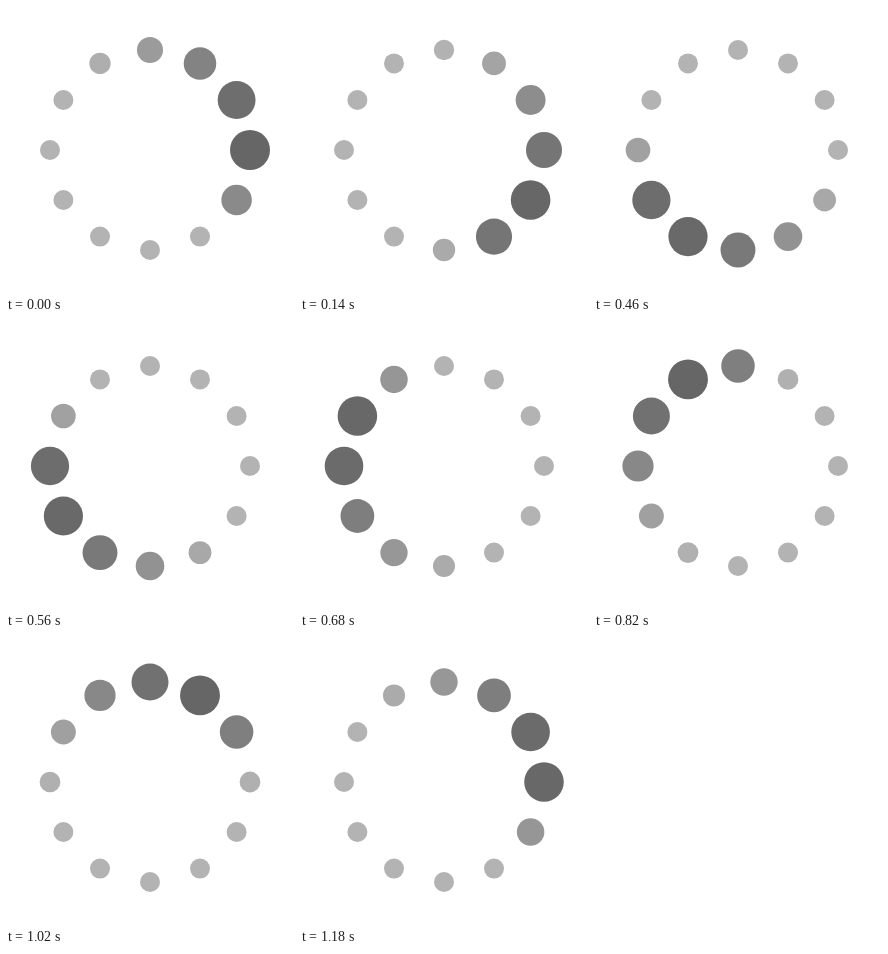
An HTML page for the animation above (1200 ms loop, 288x288 px).

```html
<!DOCTYPE html>
<html lang="en">
<head>
<meta charset="utf-8">
<title>Loading spinner</title>
<style>
html, body { margin: 0; width: 100%; height: 100%; overflow: hidden; background: #fff; }
svg { display: block; width: 100%; height: 100%; }
</style>
</head>
<body>
<svg viewBox="0 0 288 288"></svg>
<script>
const PERIOD = 1200, COUNT = 12, RISE = 205, FALL = 480;
const svg = document.querySelector('svg');

const dots = Array.from({ length: COUNT }, (_, i) => {
  const angle = i / COUNT * 2 * Math.PI;
  const dot = document.createElementNS('http://www.w3.org/2000/svg', 'circle');
  dot.setAttribute('cx', 144 + 100 * Math.cos(angle));
  dot.setAttribute('cy', 144 + 100 * Math.sin(angle));
  return svg.appendChild(dot);
});

const ease = p => (1 - Math.cos(Math.PI * p)) / 2;

// Swell of a dot, 0 to 1, by the time since its peak
function swell(age) {
  if (age < FALL) return 1 - ease(age / FALL);
  return ease(Math.max(0, 1 - (PERIOD - age) / RISE));
}

function draw(now) {
  dots.forEach((dot, i) => {
    const age = (now + PERIOD - i * PERIOD / COUNT) % PERIOD;
    const s = swell(age);
    const grey = Math.round(179 - 77 * s);
    dot.setAttribute('r', 10 + 10 * s);
    dot.setAttribute('fill', `rgb(${grey},${grey},${grey})`);
  });
}

function tick() {
  draw(performance.now());
  requestAnimationFrame(tick);
}
tick();
</script>
</body>
</html>
```
